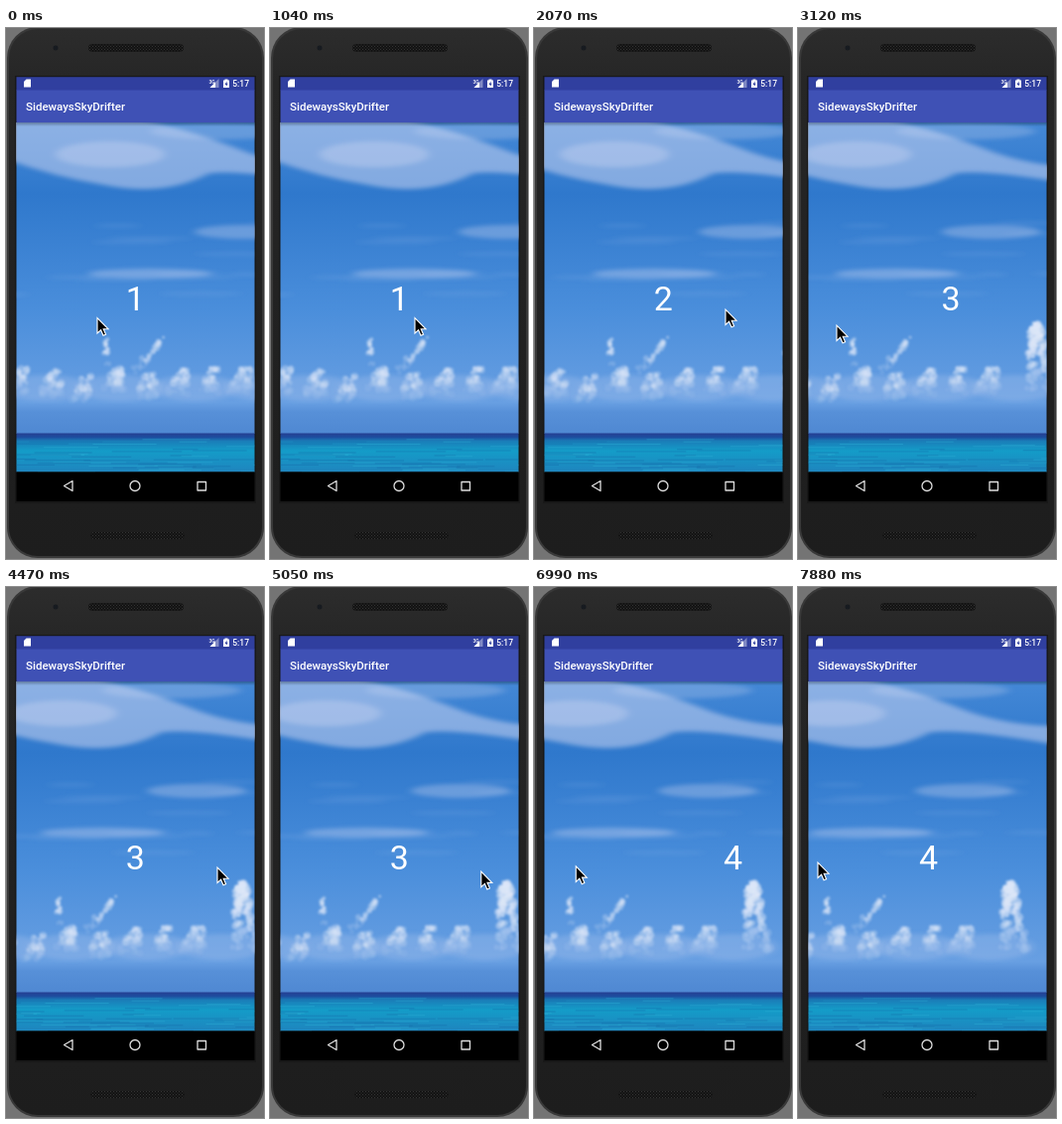
Write an HTML page that moves like this. It is 260 px wide and 534 px high and loops after 8 s.

```html
<!DOCTYPE html>
<html lang="en">
<head>
<meta charset="utf-8">
<title>Parallax pager</title>
<style>
  html, body { margin: 0; width: 100%; height: 100%; overflow: hidden; background: #747474; }
  svg { display: block; width: 260px; height: 534px; font-family: Roboto, sans-serif; fill: #fff; }
</style>
</head>
<body>
<svg viewBox="0 0 260 534">
  <defs>
    <linearGradient id="sky" x2="0" y2="1">
      <stop offset="0" stop-color="#4488d6"/>
      <stop offset=".23" stop-color="#2f78cc"/>
      <stop offset=".6" stop-color="#4a8edb"/>
      <stop offset=".9" stop-color="#689fe2"/>
      <stop offset=".93" stop-color="#5790d8"/>
      <stop offset="1" stop-color="#4f88d2"/>
    </linearGradient>
    <linearGradient id="sea" x2="0" y2="1">
      <stop offset="0" stop-color="#253f92"/>
      <stop offset=".1" stop-color="#1d4d9f"/>
      <stop offset=".2" stop-color="#1a7db8"/>
      <stop offset=".45" stop-color="#149cc8"/>
      <stop offset="1" stop-color="#1f84be"/>
    </linearGradient>
    <linearGradient id="body" x2="0" y2="1">
      <stop offset="0" stop-color="#2c2c2c"/>
      <stop offset=".1" stop-color="#262626"/>
      <stop offset="1" stop-color="#1d1d1d"/>
    </linearGradient>
    <linearGradient id="shade" x2="0" y2="1">
      <stop offset="0" stop-opacity=".3"/>
      <stop offset="1" stop-opacity="0"/>
    </linearGradient>
    <pattern id="mesh" width="3" height="3" patternUnits="userSpaceOnUse">
      <path fill="#121212" d="M0 0h3v3H0z"/>
      <path fill="#343434" d="M0 0h1v1H0zM1.5 1.5h1v1h-1z"/>
    </pattern>
    <filter id="soft" x="-20%" y="-40%" width="140%" height="180%"><feGaussianBlur stdDeviation="4 2"/></filter>
    <filter id="fluff"><feGaussianBlur stdDeviation=".8"/></filter>
    <clipPath id="view"><path d="M10.5 95h240v351.500h-240z"/></clipPath>
  </defs>

  <!-- phone -->
  <rect x="1" y="-1" width="259" height="534" rx="31" fill="#383838"/>
  <rect x="3" y="1" width="255" height="530" rx="29" fill="url(#body)"/>
  <path fill="#181818" d="M9 48h243v430H9z"/>
  <rect x="83" y="16" width="96" height="8" rx="4" fill="url(#mesh)"/>
  <rect x="85" y="507" width="95" height="7" rx="3.5" fill="url(#mesh)"/>
  <circle cx="50" cy="20" r="2.5" fill="#171b20"/>

  <!-- pager -->
  <g clip-path="url(#view)">
    <g id="scene">
      <path fill="url(#sky)" d="M0 95h340v313H0z"/>
      <g id="wisps" filter="url(#soft)" fill="#d3daf3">
        <path opacity=".5" d="M0 90H130Q190 104 235 122T340 140V160Q240 142 205 146 160 170 100 158 50 150 0 132Z"/>
      </g>
      <g id="puffs" filter="url(#fluff)"></g>
      <path fill="url(#sea)" d="M0 407.500h340V447H0z"/>
      <g id="waves"></g>
    </g>
    <path fill="url(#shade)" d="M10 95h241v4H10z"/>
    <g id="pages" font-size="34" text-anchor="middle"></g>
  </g>

  <!-- bars -->
  <path fill="#303f9f" d="M10.500 49.300h240V63h-240z"/>
  <path fill="#3f51b5" d="M10.500 62.500h240V95h-240z"/>
  <path d="M20.500 51.500H25v8h-7V54z"/>
  <text x="204.500" y="56" font-size="5" font-weight="500">3G</text>
  <path opacity=".4" d="M214.500 51v9h-9z"/>
  <path d="M211 54.500V60h-5.500z"/>
  <path d="M220.500 51.500h3v1h1.500V60h-6v-7.500h1.500z"/>
  <path fill="#303f9f" d="M222.500 53.500l-2 3.500h1.300v2l1.900-3.300h-1.200z"/>
  <text x="245" y="59" font-size="8.500" font-weight="500" text-anchor="end">5:17</text>
  <text x="20" y="83" font-size="11.500" font-weight="500">SidewaysSkyDrifter</text>
  <path fill="#000" d="M10.500 446.500h240V476h-240z"/>
  <g fill="none" stroke="#dedede" stroke-width="1.300">
    <path d="M67 455.500v10l-8.500-5zM193 456.500h8.500v8.500H193z" stroke-linejoin="round"/>
    <circle cx="130" cy="460.500" r="5"/>
  </g>

  <path id="cursor" fill="#000" stroke="#fff" stroke-width="1.100" d="M0 0V15.500L3.600 12.200 6 17.800 8.600 16.700 6.200 11.200H11z"/>
</svg>
<script>
const LOOP = 8000, TICK = 148.5, PAGE = 240, DRIFT = 24, SLOP = 36, SETTLE = 5;
const $ = id => document.getElementById(id);

function add(parent, name, attrs, text = '') {
  const el = document.createElementNS('http://www.w3.org/2000/svg', name);
  for (const k in attrs) el.setAttribute(k, attrs[k]);
  el.textContent = text;
  $(parent).append(el);
  return el;
}

let seed = 7;
const rnd = () => (seed = seed * 16807 % 2147483647) / 2147483647;

const streak = (cx, cy, rx, ry, opacity) =>
  add('wisps', 'ellipse', { cx, cy, rx, ry, opacity });

// A cumulus heap: small puffs, wider and fainter towards the foot
function heap(x, top, w, h, lean = 0, bright = .4) {
  for (let i = 0; i < 12 + w * h / 22; i++) {
    const d = rnd(), r = 1.5 + rnd() * w / 9;
    add('puffs', 'circle', {
      cx: x + lean * d + (rnd() - .5) * w * (.4 + .6 * d),
      cy: top + r + d * (h - r), r,
      fill: d > .65 ? '#a9c6ee' : '#dfe8f8',
      opacity: bright * (1.1 - d * .6)
    });
  }
}

streak(105, 127, 55, 13, .35);
streak(215, 104, 70, 8, .25);
streak(240, 205, 50, 7, .32);
streak(145, 247, 62, 5, .35);
for (let i = 0; i < 14; i++) streak(rnd() * 340, 185 + rnd() * 90, 15 + rnd() * 30, 1.5, .12);
for (let x = 40; x < 340; x += 75) streak(x, 362, 45, 13, .2);

for (let x = 18; x < 270; x += 32) heap(x, 338 + rnd() * 10, 18 + rnd() * 10, 28, -6, .3);
heap(101, 311, 9, 28);
heap(157, 309, 13, 38, -28);
heap(284, 294, 28, 72, 6, .55);

for (let i = 0; i < 50; i++) {
  add('waves', 'rect', {
    x: rnd() * 340 - 20, y: 413 + rnd() * 33, width: 15 + rnd() * 60, height: 1,
    fill: i % 2 ? '#1568a6' : '#2fb0d4', opacity: .4
  });
}

const digits = [1, 2, 3, 4].map(n => add('pages', 'text', { y: 284 }, n));

// Moving spans in ticks; everything rests in between.
const spans = [[1, 4], [7, 14], [17, 24], [30, 36], [39, 41], [44, 47], [50, 53]];
const movesUpTo = tick => spans.reduce((n, [from, to]) =>
  n + Math.max(0, Math.min(tick, to) - from + 1), 0);

// Pointer turning points: move, x, y
const path = [
  [0, 92, 291.5], [4, 182, 291], [5, 146, 291.5], [8, 45, 297], [12, 193, 283],
  [17, 39, 299], [20, 39, 299], [21, 213, 282], [23, 248, 284], [28, 160, 289.5],
  [36, 3, 278], [38, 20, 277]
];

function pointer(move) {
  const i = Math.max(1, path.findIndex(p => p[0] >= move));
  const a = path[i - 1], b = path[i], f = (move - a[0]) / (b[0] - a[0]);
  return [1, 2].map(j => a[j] + (b[j] - a[j]) * f);
}

// Moves at which each swipe is pressed and released
const swipes = [[4, 8], [12, 15], [23, 35]];

function swiped(move, [press, release]) {
  if (move <= press) return 0;
  const held = pointer(press)[0] - pointer(Math.min(move, release))[0];
  const drag = Math.max(0, held - SLOP) / PAGE;
  const left = 1 - Math.min(1, Math.max(0, move - release) / SETTLE);
  return 1 - (1 - drag) * left ** 4;
}

function draw() {
  const tick = Math.floor((performance.now() % LOOP + 10) / TICK);
  const move = movesUpTo(tick);
  const [x, y] = pointer(move);
  const page = swipes.reduce((sum, s) => sum + swiped(move, s), 0);
  $('cursor').setAttribute('transform', `translate(${x} ${y})`);
  $('scene').setAttribute('transform', `translate(${-DRIFT * page} 0)`);
  digits.forEach((d, i) => d.setAttribute('x', 130.2 + PAGE * (i - page)));
  requestAnimationFrame(draw);
}
draw();
</script>
</body>
</html>
```
